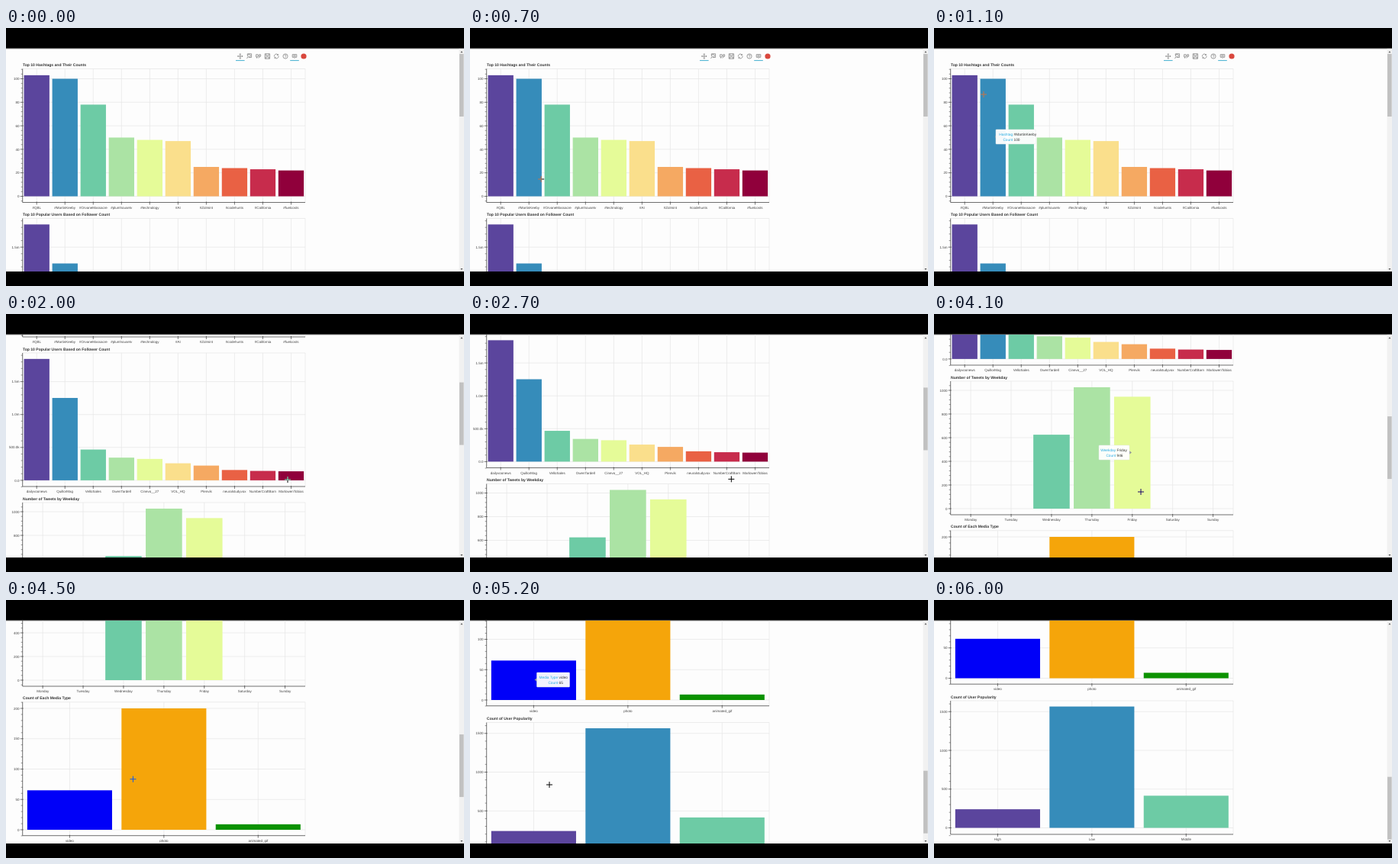
Animation, 600 px wide and 338 px high, one loop 6100 ms. Source, as an HTML page:

```html
<!DOCTYPE html>
<html lang="en">
<head>
<meta charset="utf-8">
<title>Chart dashboard</title>
<style>
  html, body { margin: 0; width: 100%; height: 100%; overflow: hidden; background: #000; }
  svg { display: block; width: 100vw; height: 100vh; }
  text { font-family: "Liberation Sans", Arial, sans-serif; text-rendering: geometricPrecision; }
  #cursor { mix-blend-mode: difference; }
</style>
</head>
<body>
<svg id="stage" viewBox="0 0 600 338">
  <defs><clipPath id="view"><rect y="27" width="600" height="292"/></clipPath></defs>
  <rect width="600" height="338" fill="#000"/>
  <rect y="26" width="600" height="1.2" fill="#4a4a4a"/>
  <rect y="27.2" width="600" height="291.8" fill="#fdfdfd"/>
  <g clip-path="url(#view)"><g id="page"></g></g>
  <rect x="593.5" y="27.2" width="6.5" height="291.8" fill="#f1f1f1"/>
  <path d="M595.4 32.2l1.5-2 1.5 2zM595.4 315l1.5 2 1.5-2z" fill="#555"/>
  <rect id="thumb" x="594" width="5.6" height="82" fill="#c1c1c1"/>
  <path id="cursor" d="M-4 0H4M0 -4V4" stroke="#fff" stroke-width="1" fill="none"/>
</svg>
<script>
const LOOP = 6100, STEP = 100;
const LEFT = 21.7, RIGHT = 392, WIDTH = RIGHT - LEFT;
const SPECTRAL = ['#5b459d', '#368cba', '#6dcba5', '#abe3a4', '#e5fb98',
  '#fadf8c', '#f5a962', '#e96144', '#c72c4c', '#90003b'];

const charts = [
  { title: 'Top 10 Hashtags and Their Counts', top: 53.5, zero: 220.5, scale: 1.54, step: 20,
    names: ['#QBL', '#MartinKeeby', '#OrvaneMassacre', '#plumhousetv', '#technology', '#AI',
      '#Zolmint', '#codehunts', '#California', '#fuelcosts'],
    values: [103, 100, 78, 50, 48, 47, 25, 24, 23, 22] },
  { title: 'Top 10 Popular Users Based on Follower Count', top: 249.5, zero: 416.4, scale: 0.0862, step: 500,
    label: v => v === 0 ? '0.0' : v < 1000 ? v + '.0k' : (v / 1000).toFixed(1) + 'm',
    names: ['dailyvoonews', 'QuillorMag', 'VelloSales', 'OwenTardell', 'Cinevo__27', 'VOL_HQ',
      'Plenvik', 'neuralstudyvox', 'NumberCraftBarn', 'MarlowenTobias'],
    values: [1845, 1252, 468, 345, 325, 259, 224, 157, 143, 137] },
  { title: 'Number of Tweets by Weekday', top: 445.5, zero: 612.5, scale: 0.155, step: 200,
    names: ['Monday', 'Tuesday', 'Wednesday', 'Thursday', 'Friday', 'Saturday', 'Sunday'],
    values: [0, 0, 625, 1026, 946, 0, 0] },
  { title: 'Count of Each Media Type', top: 641.2, zero: 808.5, scale: 0.795, step: 50,
    names: ['video', 'photo', 'animated_gif'], values: [65, 200, 9],
    colors: ['#0000f8', '#f5a50a', '#0b9200'] },
  { title: 'Count of User Popularity', top: 838, zero: 1004.5, scale: 0.1015, step: 500,
    names: ['High', 'Low', 'Middle'], values: [240, 1566, 415] }
];

// Pop-ups in page coordinates; x, y is the tip of the arrow.
const tips = [
  { from: 1000, to: 1300, x: 80, y: 142.5, box: 81, width: 52, split: 103.2, rows: [['Hashtag', '#MartinKeeby'], ['Count', '100']] },
  { from: 3500, to: 4300, x: 259, y: 539, box: 216, width: 40, split: 238.2, rows: [['Weekday', 'Friday'], ['Count', '946']] },
  { from: 4700, to: 5300, x: 84.5, y: 782, box: 87.5, width: 43, split: 115.2, rows: [['Media Type', 'video'], ['Count', '65']] }
];

const scrollKeys = [[1300, 0], [1700, 198.5], [2600, 198.5], [3000, 296.5], [4000, 296.5],
  [4100, 357.5], [4600, 545], [5000, 545], [5200, 677.5], [5300, 706]];
const cursorKeys = [[300, 130, 230], [800, 84, 190], [1000, 80, 142], [1100, 65, 87],
  [1300, 72, 140], [1700, 250, 200], [2000, 369, 217], [2600, 366, 215], [3200, 224, 223],
  [3500, 258, 240], [4100, 271, 233], [4800, 88, 236], [5200, 104, 242], [5600, 104, 242]];

const byId = id => document.getElementById(id);
const page = byId('page'), thumb = byId('thumb'), cursor = byId('cursor');

function add(parent, tag, attrs, content) {
  const el = document.createElementNS('http://www.w3.org/2000/svg', tag);
  for (const key in attrs) el.setAttribute(key, attrs[key]);
  if (content !== undefined) el.textContent = content;
  parent.appendChild(el);
  return el;
}
const rect = (parent, x, y, width, height, fill) => add(parent, 'rect', { x, y, width, height, fill });
const line = (parent, d, stroke, width) => add(parent, 'path', { d, stroke, 'stroke-width': width, fill: 'none' });
const label = (x, y, s, anchor) =>
  add(page, 'text', { x, y, 'text-anchor': anchor, 'font-size': 4.5, fill: '#444' }, s);

function drawChart(c) {
  const bottom = c.top + 175, slot = WIDTH / c.names.length;
  const yOf = v => c.zero - v * c.scale;
  const center = i => LEFT + slot * (i + 0.5);
  let grid = `M${LEFT} ${c.top}H${RIGHT}V${bottom}`;
  let major = '', minor = '';

  for (let k = -1; yOf(k * c.step / 5) >= c.top; k++) {
    const v = k * c.step / 5, y = yOf(v);
    if (k % 5) {
      minor += `M${LEFT - 2} ${y}H${LEFT}`;
    } else {
      grid += `M${LEFT} ${y}H${RIGHT}`;
      major += `M${LEFT - 3} ${y}h4`;
      label(17.6, y + 1.6, c.label ? c.label(v) : v, 'end');
    }
  }
  c.names.forEach((name, i) => {
    grid += `M${center(i)} ${c.top}V${bottom}`;
    major += `M${center(i)} ${bottom - 1}v4`;
    label(center(i), bottom + 8.2, name, 'middle');
  });

  line(page, grid, '#e6e6e6', 0.7);
  c.values.forEach((v, i) => {
    if (v) rect(page, center(i) - slot * 0.45, yOf(v), slot * 0.9, v * c.scale, (c.colors || SPECTRAL)[i]);
  });
  line(page, major, '#222', 0.6);
  line(page, minor, '#333', 0.5);
  line(page, `M${LEFT} ${c.top}V${bottom}H${RIGHT}`, '#333', 0.7);
  add(page, 'text', { x: 22, y: c.top - 3.4, 'font-size': 5.07, 'font-weight': 700, fill: '#333' }, c.title);
}

function drawToolbar() {
  const icon = (x, d) => add(page, 'path', { d, transform: `translate(${x} 37)`,
    stroke: '#858585', 'stroke-width': 0.8, fill: 'none' });
  icon(306.8, 'M-3.3 0H3.3M0 -3.3V3.3M-2.3 -1L-3.3 0-2.3 1M2.3 -1L3.3 0 2.3 1M-1 -2.3L0 -3.3 1 -2.3M-1 2.3L0 3.3 1 2.3');
  icon(318.8, 'M-2.5 -3.2H2.8V1.5H-.5M-2.5 -3.2V-1M1.4 -.7A1.8 1.8 0 1 1 -2.2 -.7A1.8 1.8 0 1 1 1.4 -.7M-1.7 .8L-3.4 3');
  icon(330.6, 'M-3 -2.2H-.5V1H-3zM1 -2.2H3V.2H1zM-2 1V2.7M.2 2.5L2 .2');
  icon(342.4, 'M-3.2 -3.2H3.2V3.2H-3.2zM-1.7 -3.2V-.7H1.7V-3.2M-2 3.2V1H2V3.2');
  icon(354.2, 'M-2.8 .5A2.8 2.8 0 0 1 2 -2M2.8 -.5A2.8 2.8 0 0 1 -2 2M2.2 -3V-1.4H.7M-2.2 3V1.4H-.7');
  icon(366, 'M3.1 0A3.1 3.1 0 1 1 -3.1 0A3.1 3.1 0 1 1 3.1 0M-1 -.7C-1 -2.2 1.1 -2.1 1 -.7C1 0 0 0 0 .9M0 1.5V2.1');
  icon(378, 'M-2.8 -2.3H2.8V1.3H.8L0 2.5-.8 1.3H-2.8zM-1.6 -1.1H1.6M-1.6 .2H1.6');
  add(page, 'circle', { cx: 390, cy: 37, r: 3.6, fill: '#d9473d' });
  line(page, 'M301 42.6H312.6M372.2 42.6H383.8', '#45b0d0', 1);
}

function drawTip(tip) {
  const g = add(page, 'g', {}), { x, y, box, width, split } = tip;
  const side = x < box ? box : box + width;
  add(g, 'path', { d: `M${x} ${y}L${side} ${y - 2.3}V${y + 2.3}z`, fill: '#909599' });
  add(g, 'rect', { x: box, y: y - 9.5, width, height: 19, rx: 0.8,
    fill: '#fff', 'fill-opacity': 0.95, stroke: '#e0e4e5', 'stroke-width': 0.5 });
  tip.rows.forEach(([key, value], i) => {
    const ty = y - 1.5 + i * 7.3;
    add(g, 'text', { x: split, y: ty, 'text-anchor': 'end', 'font-size': 4.8, fill: '#26aae1' }, key);
    add(g, 'text', { x: split + 1.3, y: ty, 'font-size': 4.8, fill: '#333' }, value);
  });
  tip.node = g;
}

function at(keys, t, column = 1) {
  if (t <= keys[0][0]) return keys[0][column];
  for (let i = 1; i < keys.length; i++) {
    const a = keys[i - 1], b = keys[i];
    if (t <= b[0]) return a[column] + (b[column] - a[column]) * (t - a[0]) / (b[0] - a[0]);
  }
  return keys[keys.length - 1][column];
}

const show = (el, on) => el.setAttribute('visibility', on ? 'visible' : 'hidden');

function render(time) {
  const t = Math.floor(time % LOOP / STEP) * STEP;
  const scroll = at(scrollKeys, t);
  page.setAttribute('transform', `translate(0 ${-scroll})`);
  thumb.setAttribute('y', 34 + scroll * 0.28);
  tips.forEach(tip => show(tip.node, t >= tip.from && t < tip.to));
  cursor.setAttribute('transform', `translate(${at(cursorKeys, t)} ${at(cursorKeys, t, 2)})`);
  show(cursor, t >= 300 && t < 5700);
}

drawToolbar();
charts.forEach(drawChart);
tips.forEach(drawTip);

const start = performance.now();
function frame() {
  render(performance.now() - start);
  requestAnimationFrame(frame);
}
frame();
</script>
</body>
</html>
```
